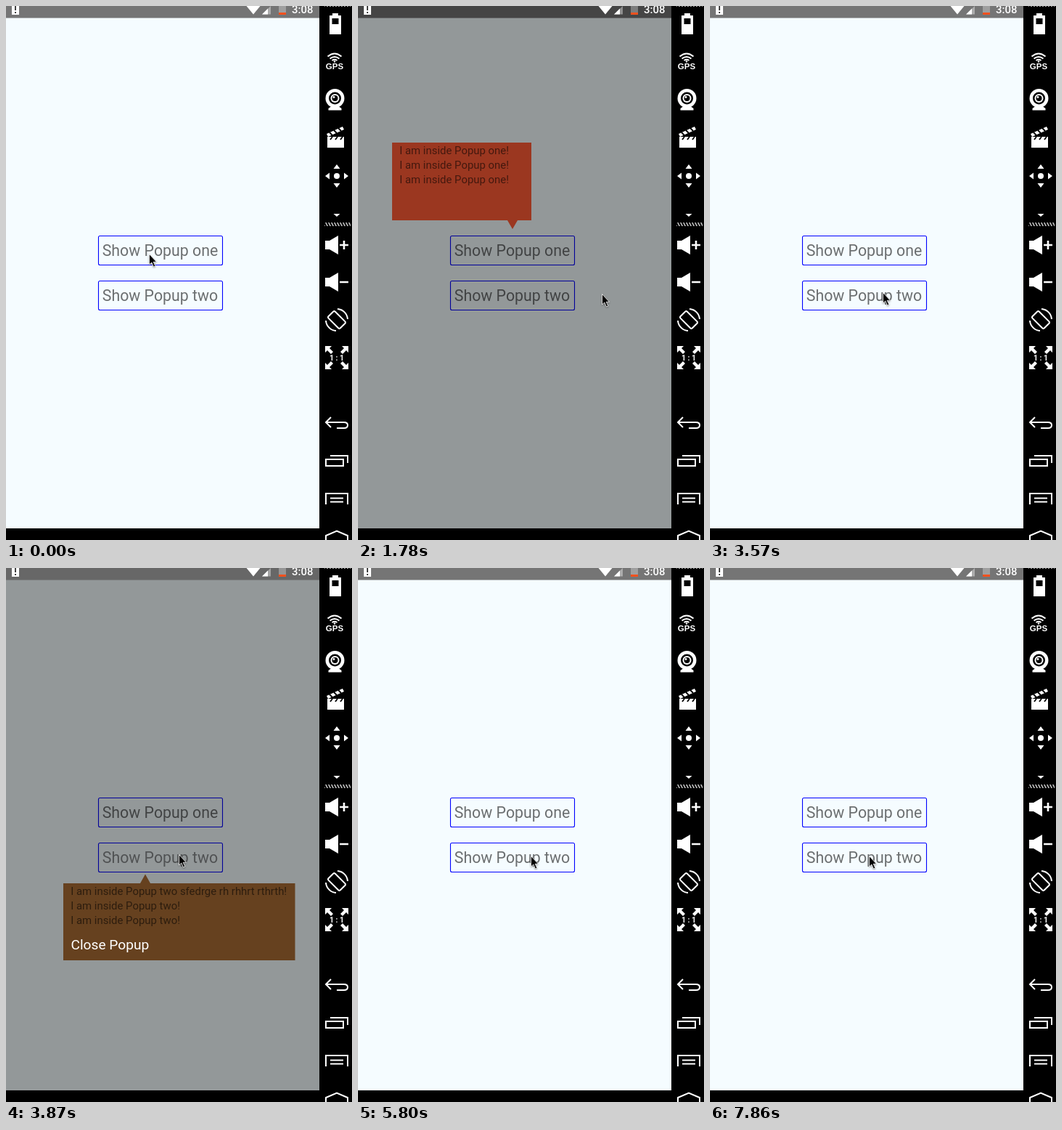
These frames come from a looping animation (477 px wide and 735 px high, 8000 ms). An HTML page:

```html
<!DOCTYPE html>
<html lang="en">
<head>
<meta charset="utf-8">
<style>
  html, body { margin: 0; width: 100%; height: 100%; overflow: hidden; background: #000; }
  svg { display: block; width: 477px; height: 735px; font-family: Roboto, sans-serif; }
  .button { font-size: 21.33px; text-anchor: middle; fill: #000; fill-opacity: .56; }
  .note { font-size: 14.93px; fill: #000; fill-opacity: .56; }
  .frame { fill: none; stroke: #00f; stroke-width: 1.1; }
  .line { fill: none; stroke: #fff; stroke-width: 2; }
</style>
</head>
<body>
<svg viewBox="0 0 477 735">
  <defs>
    <pattern id="hatch" width="4" height="6" y="298" patternUnits="userSpaceOnUse">
      <path d="M0 0h1.6l2.4 5h-1.6z" fill="#ccc"/>
    </pattern>
    <path id="corner" d="M-16-16h9l-3 3 5 5-3 3-5-5-3 3z"/>
    <path id="speaker" d="M440-6h6l12-7v26l-12-7h-6z"/>
    <path id="wedge" d="M0-16l4.5 6h-9z"/>
  </defs>

  <!-- App -->
  <rect width="432" height="719" fill="#f5fcff"/>
  <rect class="frame" x="127.5" y="316.5" width="171" height="40" rx="2"/>
  <rect class="frame" x="127.5" y="378.5" width="171" height="40" rx="2"/>
  <text class="button" id="label1" x="212.5" y="344">Show Popup one</text>
  <text class="button" id="label2" x="212.5" y="406">Show Popup two</text>
  <rect id="shade" y="16" width="432" height="703" opacity=".4"/>

  <g id="popup1">
    <path d="M47 188h192v107h-19l-7 12-7-12H47z" fill="#9b3720"/>
    <g class="note">
      <text x="57.2" y="204">I am inside Popup one!</text>
      <text x="57.2" y="224">I am inside Popup one!</text>
      <text x="57.2" y="244">I am inside Popup one!</text>
    </g>
  </g>
  <g id="popup2">
    <path d="M79 434h106l7-12.5 7 12.5h199.5v106H79z" fill="#66411f"/>
    <g class="note">
      <text x="89.2" y="450">I am inside Popup two sfedrge rh rhhrt rthrth!</text>
      <text x="89.2" y="470">I am inside Popup two!</text>
      <text x="89.2" y="490">I am inside Popup two!</text>
    </g>
    <text x="89.4" y="525" font-size="19.2" fill="#fff">Close Popup</text>
  </g>

  <!-- Status bar -->
  <rect width="432" height="16.5" fill="#757575"/>
  <rect id="barShade" width="432" height="16.5"/>
  <g fill="#fff">
    <path d="M8 0h10v12H8z"/>
    <path d="M12 0h2v6h-2zM12 8h2v2h-2z" fill="#444"/>
    <path d="M331.5 0h19L341 11.5z"/>
    <path d="M353 11.5 365 0v11.5z" opacity=".4"/>
    <path d="M353 11.5l8-8v8z"/>
    <path d="M376 0h10v12h-10z" opacity=".3"/>
    <path d="M376 9h10v3h-10z" fill="#f4511e"/>
    <text x="394" y="10" font-size="14.93" font-weight="500">3:08</text>
  </g>

  <!-- Tool strip -->
  <path d="M432 0h45v735H0v-16h432z"/>
  <g fill="#fff">
    <rect id="grip" x="439" y="298" width="36" height="5" fill="url(#hatch)"/>
    <use href="#grip" y="-302"/>
    <path d="M450 10h8v3h4v26h-16V13h4z"/>
    <path d="M449.5 17h9v8h-9z" fill="#000"/>

    <path class="line" d="M443.5 69.5q9.5-8 19 0M446.5 72.500q6.5-5 13 0M449.5 75q3.5-2.5 7 0"/>
    <circle cx="453" cy="76.5" r="1.3"/>
    <text x="453" y="87" font-size="11.5" font-weight="700" text-anchor="middle"
          font-family="Liberation Sans, sans-serif">GPS</text>

    <g transform="translate(453.5 127)">
      <circle r="13"/>
      <path d="M-5 11H5l4 3v2.5H-9V14z"/>
      <circle r="8.5" fill="#000"/>
      <circle r="6"/>
      <circle r="4" fill="#000"/>
      <circle cx="-1.5" cy="-1.5" r="1.4"/>
    </g>

    <path d="M443 180h23v15h-23zM442 176l22-10 2 4-22 10z"/>
    <path d="M446 174l4 4M452 171l4 4M458 168l4 4M447 184l3-4M454 184l3-4M461 184l3-4"
          stroke="#000" stroke-width="1.8"/>

    <g transform="translate(456 234)">
      <circle r="4"/>
      <use href="#wedge"/>
      <use href="#wedge" transform="rotate(90)"/>
      <use href="#wedge" transform="rotate(180)"/>
      <use href="#wedge" transform="rotate(270)"/>
    </g>
    <path d="M451.5 286h9l-4.5 4z"/>

    <use href="#speaker" y="329"/>
    <use href="#speaker" y="380"/>
    <path d="M460 329h12M466 323v12M460 380h12" stroke="#fff" stroke-width="2.6"/>

    <g class="line" transform="translate(456 432)">
      <rect x="-6.5" y="-11.5" width="13" height="23" rx="2" transform="rotate(-45)"/>
      <path d="M1-15A15 15 0 0 1 15-1M-1 15A15 15 0 0 1-15 1"/>
    </g>

    <g transform="translate(456 484)">
      <use href="#corner"/>
      <use href="#corner" transform="rotate(90)"/>
      <use href="#corner" transform="rotate(180)"/>
      <use href="#corner" transform="rotate(270)"/>
      <text y="4" font-size="10.5" font-weight="700" text-anchor="middle">1 : 1</text>
    </g>

    <g class="line">
      <path d="M448 566l-7 7 7 7M441 573h25q5 0 5 4t-5 4h-10"/>
      <path d="M441 624h24v9h-24zM447 619h24v10"/>
      <path d="M441 686v-15h30v15M447 677.5h18M447 682.5h18"/>
      <path d="M441 736v-7l15-6.5 15 6.5v7"/>
    </g>
  </g>

  <path id="cursor" d="M.5.5v14.5l3.3-3 2.7 6 2.4-1-2.7-5.7h4.3z"
        stroke="#fff" stroke-width=".8" style="filter:drop-shadow(0 1px 1px #0006)"/>
</svg>
<script>
const LOOP = 8000, TICK = 146;

// Popup state from each time on; 0 is closed
const popups = [[0, 0], [590, 1], [2670, 0], [3870, 2], [5070, 0], [6090, 2], [7120, 0]];

// Cursor moves: start, ticks, target x, y
const moves = [
  [0, 1, 197, 341],
  [1340, 4, 336, 396],
  [2820, 3, 253, 340],
  [3420, 2, 238, 394],
  [4020, 4, 437, 556],
  [4920, 1, 461, 570],
  [5210, 5, 238, 396],
  [6235, 4, 297, 602],
  [7270, 5, 219, 396]
];

// Shades per tick after a popup opens or closes
const opening = [.12, .32, .41], closing = [.24, .04, 0];
const fades = [.82, .96, 1];

const el = id => document.getElementById(id);
const set = (id, name, value) => el(id).setAttribute(name, value);
const show = (id, on) => set(id, 'visibility', on ? 'visible' : 'hidden');
const ease = p => p * p * (3 - 2 * p);
const begin = performance.now();

function placeCursor(time) {
  const i = moves.findLastIndex(m => m[0] <= time);
  const [start, ticks, x, y] = moves[i];
  const [, , fromX, fromY] = moves[Math.max(i - 1, 0)];
  const p = ease(Math.min(1, (Math.floor((time - start) / TICK) + 1) / ticks));
  const between = (a, b) => Math.round(a + (b - a) * p);
  set('cursor', 'transform', `translate(${between(fromX, x)} ${between(fromY, y)})`);
}

function drawPopups(time) {
  const [start, open] = popups.findLast(s => s[0] <= time);
  const tick = Math.min(2, Math.floor((time - start) / TICK));
  show('shade', open);
  set('barShade', 'opacity', open ? opening[tick] : start ? closing[tick] : 0);
  for (const n of [1, 2]) {
    show('popup' + n, open === n);
    set('label' + n, 'opacity', open === n ? fades[tick] : 1);
  }
}

function draw() {
  const time = (performance.now() - begin) % LOOP;
  placeCursor(time);
  drawPopups(time);
  requestAnimationFrame(draw);
}
draw();
</script>
</body>
</html>
```
